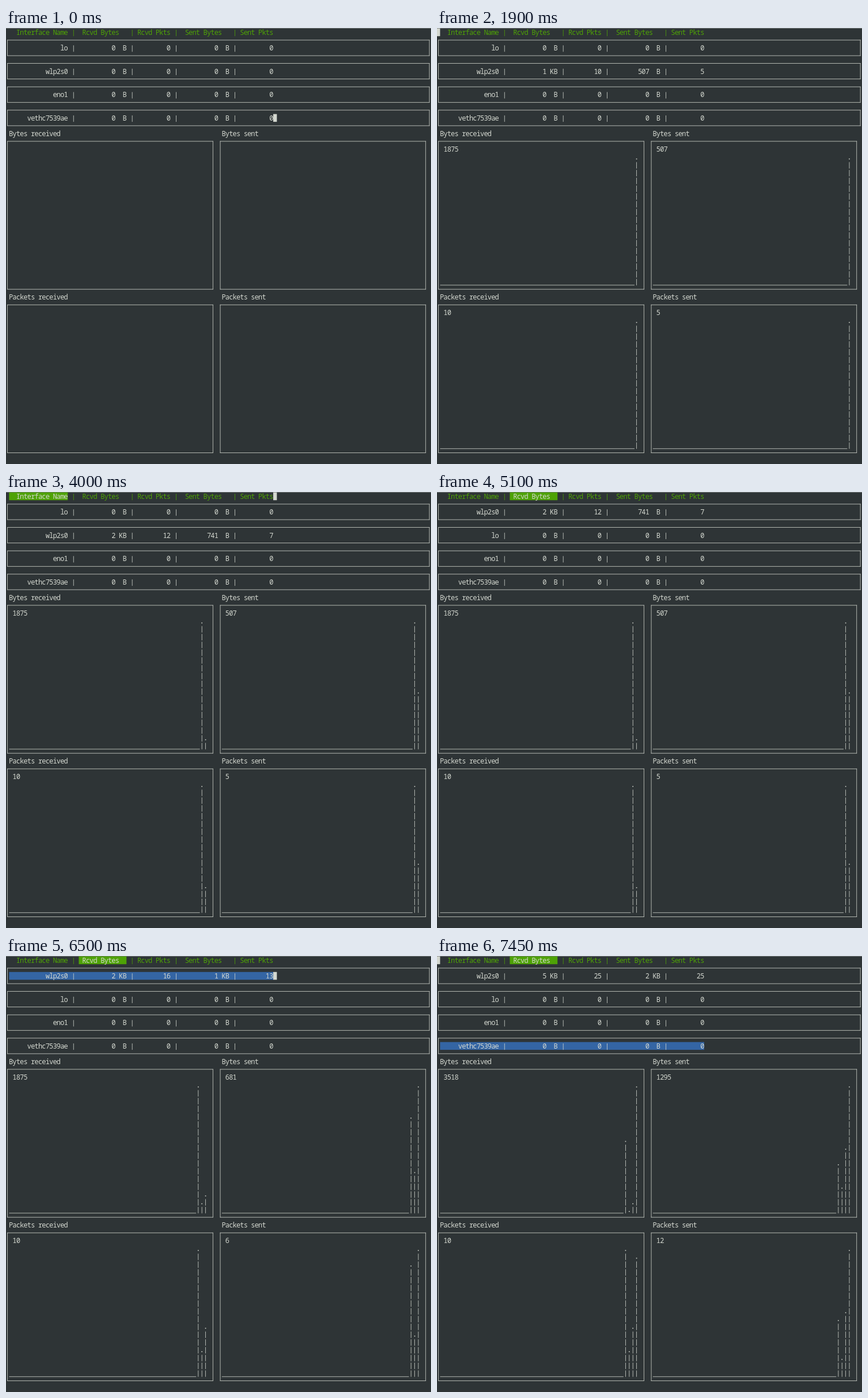
An HTML page with a canvas that plays this animation: 738 by 758 pixels, repeating every 8 s.

```html
<!DOCTYPE html>
<html lang="en">
<head>
<meta charset="utf-8">
<title>Interface monitor</title>
<style>
html, body { margin: 0; width: 100%; height: 100%; overflow: hidden; background: #2e3436; }
canvas { display: block; }
</style>
</head>
<body>
<canvas id="screen" width="738" height="758"></canvas>
<script>
const ctx = document.getElementById('screen').getContext('2d');
const LOOP = 8000;
// The terminal has 8 x 17 unit cells; U is one unit in pixels.
const U = 0.79624, CW = 8 * U, CH = 17 * U, X0 = -1, Y0 = 0.7;
const BG = '#2e3436', FG = '#d3d7cf', GREEN = '#4ea206', BLUE = '#3465a4';

// One entry per traffic sample on the active interface.
const samples = [
  { at: 1350, rb: 1875, rp: 10, sb: 507, sp: 5 },
  { at: 3350, rb: 190, rp: 2, sb: 234, sp: 2 },
  { at: 5350, rb: 300, rp: 4, sb: 681, sp: 6 },
  { at: 7450, rb: 3518, rp: 9, sb: 1295, sp: 12 }
];

// [time, column, row]; a bare time hides the cursor.
const cursorTrack = [
  [0, 73, 11], [100], [700, 73, 11], [1300], [1900, 0, 0], [3000],
  [3100, 0, 0], [3850], [4000, 73, 0], [4700, 0, 0], [5100], [5700, 0, 0],
  [6300], [6400, 0, 0], [6500, 73, 2], [6750, 73, 5], [6800, 73, 8],
  [7200, 73, 11], [7450, 0, 0]
];
const headerTrack = [[0, -1], [4000, 0], [4100, 1]];
const rowTrack = [[0, -1], [6500, 0], [6750, 1], [6800, 2], [7200, 3]];
const SORTED_AT = 4700;

const headers = [
  { text: '  Interface Name', col: 1 },
  { text: ' Rcvd Bytes  ', col: 20 },
  { text: 'Rcvd Pkts', col: 36 },
  { text: ' Sent Bytes  ', col: 48 },
  { text: 'Sent Pkts', col: 64 }
];
const charts = [
  { title: 'Bytes received', key: 'rb', col: 0, row: 13 },
  { title: 'Bytes sent', key: 'sb', col: 58, row: 13 },
  { title: 'Packets received', key: 'rp', col: 0, row: 34 },
  { title: 'Packets sent', key: 'sp', col: 58, row: 34 }
];

const px = col => X0 + col * CW;
const py = row => Y0 + row * CH;
const latest = (track, t) => track.filter(e => e[0] <= t).pop();
const sum = (list, key) => list.reduce((n, s) => n + s[key], 0);

// Fills a rectangle given in units from the corner of a cell.
function fill(col, row, x, y, w, h, color = FG) {
  ctx.fillStyle = color;
  ctx.fillRect(px(col) + x * U, py(row) + y * U, w * U, h * U);
}

const cells = (col, row, count, color) => fill(col, row, 0, 0, 8 * count, 17, color);

function put(text, col, row, color = FG) {
  [...text].forEach((ch, i) => {
    if (ch === '|') fill(col + i, row, 4, 3, 1, 14, color);
    else if (ch === '.') fill(col + i, row, 3.5, 12, 2, 2, color);
    else if (ch !== ' ') {
      ctx.fillStyle = color;
      ctx.fillText(ch, px(col + i + 0.5), py(row) + 14 * U);
    }
  });
}

function box(col, row, lastCol, lastRow) {
  const w = (lastCol - col) * 8 + 1, h = (lastRow - row) * 17 + 1;
  fill(col, row, 4, 8, w, 1);
  fill(col, lastRow, 4, 8, w, 1);
  fill(col, row, 4, 8, 1, h);
  fill(lastCol, row, 4, 8, 1, h);
}

function bytes(n) {
  const [value, unit] = n < 1024 ? [n, 'B'] : [Math.floor(n / 1024), 'KB'];
  return String(value).padStart(11) + ' ' + unit.padStart(2) + ' |';
}

function drawHeader(t) {
  const active = latest(headerTrack, t)[1];
  headers.forEach(({ text, col }, i) => {
    if (i === active) cells(col, 0, text.length, GREEN);
    put(text, col, 0, i === active ? FG : GREEN);
  });
  [18, 34, 46, 62].forEach(col => put('|', col, 0, GREEN));
}

function drawRows(t, seen) {
  const names = t < SORTED_AT
    ? ['lo', 'wlp2s0', 'eno1', 'vethc7539ae']
    : ['wlp2s0', 'lo', 'eno1', 'vethc7539ae'];
  const active = latest(rowTrack, t)[1];
  names.forEach((name, i) => {
    const row = 2 + i * 3;
    const list = name === 'wlp2s0' ? seen : [];
    box(0, row - 1, 115, row + 1);
    if (i === active) cells(1, row, 72, BLUE);
    put(name.padStart(16) + ' |' +
      bytes(sum(list, 'rb')) + String(sum(list, 'rp')).padStart(10) + ' |' +
      bytes(sum(list, 'sb')) + String(sum(list, 'sp')).padStart(10), 1, row);
  });
}

function drawChart({ title, key, col, row }, seen) {
  put(title, col + 1, row);
  box(col, row + 1, col + 56, row + 20);
  if (!seen.length) return;
  const peak = Math.max(...seen.map(s => s[key]));
  const base = row + 19, first = col + 55 - seen.length;
  put(String(peak), col + 2, row + 2);
  fill(col + 1, base, 0, 16, (first - col - 1) * 8, 1);
  seen.forEach((s, i) => {
    const height = Math.min(16, Math.floor(17 * s[key] / peak));
    for (let k = 0; k < height; k++) put('|', first + i, base - k);
    put('.', first + i, base - height);
  });
}

function draw(t) {
  const seen = samples.filter(s => s.at <= t);
  ctx.fillStyle = BG;
  ctx.fillRect(0, 0, 738, 758);
  ctx.fillStyle = '#6f7475';
  ctx.fillRect(0, 0, 738, 1);
  ctx.font = '12px "Noto Sans Mono", "DejaVu Sans Mono", monospace';
  ctx.textAlign = 'center';
  ctx.textBaseline = 'alphabetic';
  drawHeader(t);
  drawRows(t, seen);
  charts.forEach(c => drawChart(c, seen));
  const [, col, row] = latest(cursorTrack, t);
  if (col !== undefined) cells(col, row, 1, FG);
}

const start = performance.now();
function tick() {
  draw((performance.now() - start) % LOOP);
  requestAnimationFrame(tick);
}
tick();
</script>
</body>
</html>
```
